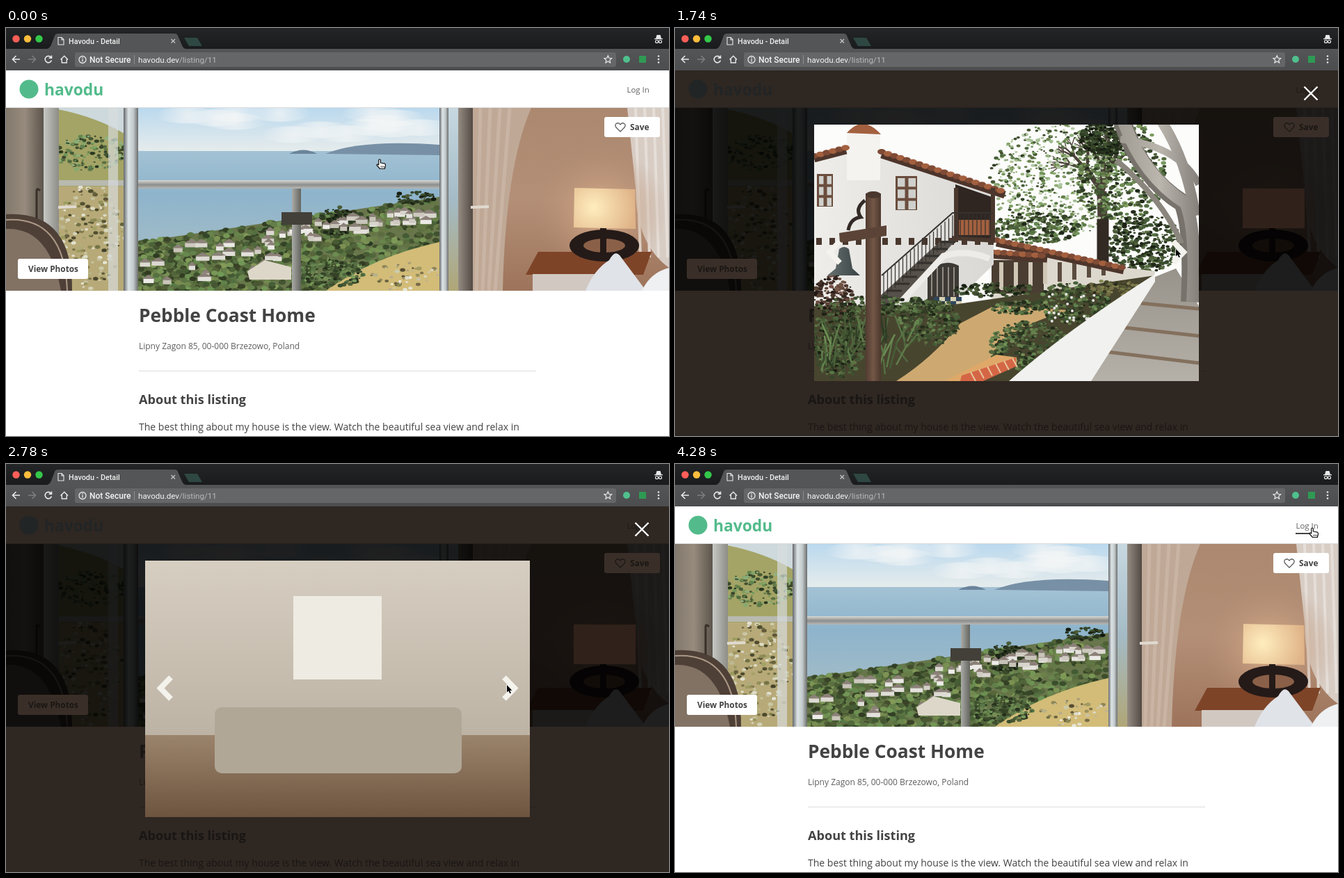
Animation, 953 px wide and 587 px high, one loop 4.92 s. Source, as an HTML page with a canvas:

```html
<!DOCTYPE html>
<html lang="en">
<head>
<meta charset="utf-8">
<title>Havodu - Detail</title>
<style>
html, body { margin: 0; width: 100%; height: 100%; overflow: hidden; background: #fff; }
canvas { display: block; }
</style>
</head>
<body>
<canvas id="stage" width="953" height="587"></canvas>
<script>
const W = 953, H = 587, LOOP = 4920, OPEN = 640, CLOSE = 4280;
const stage = document.getElementById('stage').getContext('2d');
let g = stage, seed = 7;

// ---- drawing helpers
const rnd = () => (seed = (seed * 16807) % 2147483647) / 2147483647;
const times = (n, draw) => { for (let i = 0; i < n; i++) draw(i); };
const rect = (fill, x, y, w, h) => { g.fillStyle = fill; g.fillRect(x, y, w, h); };
const oval = (fill, x, y, rx, ry = rx) => {
  g.beginPath(); g.ellipse(x, y, rx, ry, 0, 0, 7); g.fillStyle = fill; g.fill();
};
const round = (fill, x, y, w, h, r) => { g.beginPath(); g.roundRect(x, y, w, h, r); g.fillStyle = fill; g.fill(); };
const shape = (fill, d) => { g.fillStyle = fill; g.fill(new Path2D(d)); };
const stroke = (color, width, d) => { g.strokeStyle = color; g.lineWidth = width; g.stroke(new Path2D(d)); };
const line = (color, width, x0, y0, x1, y1) => stroke(color, width, `M${x0} ${y0}L${x1} ${y1}`);
const text = (s, x, y, font, fill) => { g.font = font; g.fillStyle = fill; g.fillText(s, x, y); };
const sans = (size, weight = 400) => `${weight} ${size}px "Open Sans", sans-serif`;
const ui = (size, weight = 400) => `${weight} ${size}px Roboto, sans-serif`;
const blend = (gradient, colors) => {
  colors.forEach((c, i) => gradient.addColorStop(i / (colors.length - 1), c));
  return gradient;
};
const fadeY = (y0, y1, ...colors) => blend(g.createLinearGradient(0, y0, 0, y1), colors);
const fadeX = (x0, x1, ...colors) => blend(g.createLinearGradient(x0, 0, x1, 0), colors);
const glow = (x, y, r, ...colors) => blend(g.createRadialGradient(x, y, 0, x, y, r), colors);
// Elliptical patch of small leaves, from shadow to sunlit
const leaves = (x, y, rx, ry, { hue = 85, light = 30, density = .2, size = 2.6 } = {}) =>
  times(rx * ry * density, () => {
    const a = rnd() * 2 * Math.PI, d = Math.sqrt(rnd()), s = size * (.5 + rnd());
    oval(`hsl(${hue + rnd() * 15} 25% ${light * (.4 + rnd() * 1.2)}%)`,
      x + Math.cos(a) * d * rx, y + Math.sin(a) * d * ry, s, s * .7);
  });
const limb = (color, x, y, angle, length, width, depth) => {
  const x1 = x + Math.cos(angle) * length, y1 = y + Math.sin(angle) * length;
  line(color, width, x, y, x1, y1);
  if (depth) [-.5, 0, .5].forEach(turn =>
    limb(color, x1, y1, angle + turn + rnd() * .4 - .2, length * .68, width * .55, depth - 1));
};
const layer = (draw, x = 0, y = 0, w = W, h = H) => {
  const c = document.createElement('canvas');
  c.width = W; c.height = H;
  g = c.getContext('2d');
  g.beginPath(); g.rect(x, y, w, h); g.clip();
  draw();
  g = stage;
  return c;
};

// ---- browser window
function browser() {
  const icon = '#e8e8e8';
  rect(fadeY(0, 30, '#232527', '#191b1d'), 0, 0, W, 30);
  rect(fadeY(30, 61, '#545557', '#4c4d4f'), 0, 30, W, 31);
  shape('#545557', 'M59 30Q63 29 65 24L70 11Q71 8 75 8H242Q246 8 247 11L253 25Q255 30 259 30Z');
  shape('#2f4742', 'M256 14H275L282 26H263Z');
  ['#fb5f58', '#fbbd3c', '#34c84a'].forEach((c, i) => oval(c, 14.5 + i * 16.5, 15.5, 5.2));
  stroke(icon, 1.1, 'M75 13.5H80L83 16.5V24H75ZM80 13.5V17H83');
  text('Havodu - Detail', 90, 22.5, ui(10.8, 500), '#f1f1f1');
  stroke('#c8c8c8', 1.2, 'M237.5 16l5.5 5.5m0-5.5l-5.5 5.5');
  shape(icon, 'M934 15l1.5-5h5l1.5 5zM932 15h12v1.3h-12z');
  stroke(icon, 1.2, 'M937.5 19.5a2 2 0 1 1-4 0a2 2 0 1 1 4 0h1a2 2 0 1 1 4 0a2 2 0 1 1-4 0');
  stroke(icon, 1.6, 'M20 45H9.5M14.5 40l-5 5l5 5');
  stroke('#7d7e80', 1.6, 'M32 45H42.5M37.5 40l5 5l-5 5');
  stroke(icon, 1.6, 'M64.6 42.2A4.7 4.7 0 1 0 65.4 46.5M65.5 39.5v3.8h-3.8');
  stroke(icon, 1.4, 'M78.5 45.5l5.3-5.2l5.2 5.2M80.3 44.5V50h7v-5.5');
  round('#656668', 99, 35, 778, 21, 3);
  stroke(icon, 1.3, 'M115 45.5a5 5 0 1 1-10 0a5 5 0 1 1 10 0M110 44.5v4M110 42v1.4');
  text('Not Secure', 120, 49.5, ui(12, 500), '#f4f4f4');
  rect('#8b8c8e', 184, 39, 1, 13);
  text('havodu.dev', 190, 49.5, ui(11.6), '#f4f4f4');
  text('/listing/11', 190 + g.measureText('havodu.dev').width, 49.5, ui(11.6), '#b9babb');
  const star = Array.from({ length: 10 }, (_, i) => {
    const a = (i / 5 - .5) * Math.PI, r = i % 2 ? 2.6 : 5.6;
    return [865.3 + r * Math.cos(a), 45.4 + r * Math.sin(a)];
  });
  stroke(icon, 1.2, `M${star.join('L')}Z`);
  oval('#4fc08d', 892, 45, 5);
  rect('#2f9a54', 910, 40, 10, 10);
  times(3, i => oval(icon, 938, 40.5 + i * 4.5, 1.3));
}

// ---- listing hero: a bay seen through open balcony doors
function hero() {
  const top = 115, bottom = 378;
  const post = (x, w) => rect(fadeX(x, x + w, '#63676a', '#dde4e6', '#c3cacc', '#6c6d6c'), x, top, w, bottom - top);
  // hillside in the left pane
  rect('#cdd9dc', 75, top, 95, 263);
  shape('#a4a466', 'M75 117Q130 128 170 152V378H75Z');
  leaves(122, 180, 55, 25, { light: 38, density: .12 });
  rect('#b7aa78', 75, 228, 95, 150);
  leaves(122, 300, 50, 75, { hue: 48, light: 55, density: .06 });
  rect('#b8b9b0', 75, 219, 95, 8);
  rect('#dadfe0aa', 147, top, 14, 263);
  // sky, sea and headlands
  rect(fadeY(top, 178, '#bbd9ee', '#e6ecec'), 190, top, 433, 63);
  times(14, () => {
    const x = 220 + rnd() * 380, y = 120 + rnd() * 35;
    oval(glow(x, y, 45, '#f4f6f6bb', '#f4f6f600'), x, y, 45, 12);
  });
  rect(fadeY(177, 300, '#a3c2d4', '#8eb4cc', '#9dbac8'), 190, 177, 433, 140);
  shape('#6a849b', 'M407 181Q428 170 447 181Z');
  shape('#7790a6', 'M459 181Q510 160 623 168V183Z');
  // coastal town below a rising ridge
  const ridge = x => 308 - (x - 190) * .15;
  shape('#69764c', `M190 ${ridge(190)}L623 ${ridge(623)}V378H190Z`);
  times(1500, () => {
    const x = 190 + rnd() * 433, y = ridge(x) + rnd() * (bottom - ridge(x));
    oval(`hsl(${78 + rnd() * 20} 27% ${18 + rnd() * 30}%)`, x, y, 5, 3.5);
  });
  leaves(475, 278, 27, 22, { light: 18 });
  leaves(588, 244, 28, 10, { light: 18 });
  times(65, () => {
    const x = 192 + rnd() * 415, y = ridge(x) + 8 + rnd() * (x < 410 ? 58 : 22), w = 8 + rnd() * 12;
    shape('#8c8179', `M${x - 2} ${y}l${w / 2 + 2} -6l${w / 2 + 2} 6z`);
    rect(`hsl(40 12% ${75 + rnd() * 18}%)`, x, y, w, 6);
  });
  shape('#d2bc78', 'M460 378Q530 328 623 308V378Z');
  leaves(575, 358, 50, 20, { hue: 42, light: 60, density: .05 });
  leaves(470, 352, 48, 20, { light: 32 });
  shape('#ddd7c9', 'M347 350l25-16l38 10v18h-60z');
  // railing and frames
  rect(fadeY(219, 232, '#d8d8d4', '#8d8f8e', '#bfc0bd'), 190, 219, 433, 12);
  rect(fadeX(411, 424, '#aaaaa6', '#64655f'), 411, 231, 13, 147);
  rect('#43403a', 396, 265, 44, 18);
  rect(fadeX(0, 54, '#83796c', '#968b7d', '#5d554c'), 0, top, 54, 263);
  rect(fadeX(54, 76, '#c6c8c5', '#8d8c86'), 54, top, 22, 263);
  post(169, 21);
  post(623, 13);
  rect(fadeY(top, bottom, '#c7d8e0', '#a4bbc6', '#b0a677'), 636, top, 14, 263);
  rect(fadeX(650, 671, '#958c83', '#524a44'), 650, top, 21, 263);
  // wall and curtains
  rect(fadeY(top, bottom, '#ab886f', '#b48f77', '#9d745b'), 671, top, 282, 263);
  shape('#bfa896', 'M671 115H755Q718 200 714 378H671Z');
  shape('#d8cdc4', 'M893 115H953V345Q905 310 905 230Z');
  times(4, i => {
    line('#d2c0b188', 5, 682 + i * 14, top, 676 + i * 9, bottom);
    line('#e5ded8', 4, 905 + i * 13, top, 912 + i * 13, 330);
  });
  [75, 668].forEach(x => line('#e0dad0', 4, x, 258, x + 26, 257));
  // lamp, cabinet and bed
  oval(glow(855, 265, 95, '#dcae88', '#b48f7700'), 855, 265, 95);
  shape('#7e4428', 'M765 322H928L916 355H747Z');
  rect('#d1c8c2', 757, 354, 100, 24);
  oval('#241a18', 860, 313, 50, 23);
  oval('#8b6048', 860, 313, 30, 10);
  rect('#241a18', 854, 287, 9, 38);
  shape(glow(845, 258, 60, '#ffedbd', '#dfb388'), 'M817 230L904 232L905 289L816 287Z');
  shape('#e0e3e8', 'M833 378Q845 348 867 334Q875 319 882 327L920 378Z');
  shape('#eef0f2', 'M914 378Q926 352 953 345V378Z');
  // armchair
  shape('#4e4037', 'M0 268Q96 262 95 378H0Z');
  shape('#827264', 'M0 289Q62 286 79 378H0Z');
  stroke('#ab9886', 2, 'M0 276Q84 270 88 378');
  stroke('#393029', 3, 'M44 274V235Q44 229 49 234');
}
const heroLayer = layer(hero, 0, 115, W, 263);

// ---- listing page, plain or dimmed behind the gallery
function page(dim) {
  const c = dim
    ? { paper: '#2f2722', ink: '#191614', soft: '#1b1816', brand: '#222526', rule: '#27211d', button: '#3a2f28' }
    : { paper: '#fff', ink: '#434343', soft: '#5e5e5e', brand: '#53bb8b', rule: '#dcdcdc', button: '#fff' };
  rect(c.paper, 0, 61, W, H - 61);
  oval(c.brand, 33, 88, 13.5);
  text('havodu', 55, 96.5, sans(22.8, 700), c.brand);
  text('Log In', 892.5, 93, sans(11.4), c.soft);
  rect(c.rule, 0, 114, W, 1);
  g.drawImage(heroLayer, 0, 0);
  if (dim) {
    rect('rgba(0,0,0,.87)', 0, 115, W, 263);
    rect('#30211a', 816, 231, 89, 57);
  }
  round(c.button, 860, 128, 80, 29, 3);
  round(c.button, 17, 332, 101, 29, 3);
  stroke(c.soft, 1.3, 'M883 149L877 143Q874.5 139.5 877.5 137.3Q881 135.7 883 139Q885 135.7 888.5 137.3Q891.5 139.5 889 143Z');
  text('Save', 897, 147, sans(11.9, 700), c.ink);
  text('View Photos', 32, 351, sans(11.8, 700), c.ink);
  text('Pebble Coast Home', 191, 423, sans(26.3, 700), c.ink);
  text('Lipny Zagon 85, 00-000 Brzezowo, Poland', 191, 461.5, sans(12), c.soft);
  rect(c.rule, 191, 493, 571, 1);
  text('About this listing', 191, 541, sans(18.1, 700), c.ink);
  text('The best thing about my house is the view. Watch the beautiful sea view and relax in', 191, 579, sans(14), c.ink);
  browser();
}

// ---- gallery pictures
function villa() {
  const timber = '#4a382e', tile = '#a3603f', iron = '#35322f';
  const eave = (x0, y0, x1, y1) => {
    line('#4d352b', 11, x0, y0 + 4, x1, y1 + 4);
    const n = (x1 - x0) / 9;
    times(n, i => oval(i % 2 ? tile : '#7f4b35', x0 + i * 9, y0 + (y1 - y0) * i / n, 6, 4));
  };
  const sash = (x, y, w, h) => {
    rect('#6a4d3d', x, y, w, h);
    times(6, i => rect('#cfd0cc', x + 3 + i % 2 * w / 2, y + 3 + (i >> 1) * h / 3, w / 2 - 5, h / 3 - 4));
  };
  rect('#fcfcfb', 200, 139, 553, 369);
  // trees and distant houses
  limb('#4a4038', 615, 290, -1.6, 55, 14, 4);
  leaves(550, 220, 98, 82, { light: 48, density: .1, size: 2.2 });
  leaves(640, 205, 65, 75, { light: 32, density: .12 });
  leaves(620, 158, 38, 26, { light: 17, density: .3 });
  leaves(520, 288, 65, 22, { light: 30 });
  leaves(675, 310, 55, 42, { light: 23 });
  line('#332a24', 17, 615, 372, 615, 275);
  shape('#ddd8ce', 'M455 320L690 350V378L455 390Z');
  shape('#4a3d32', 'M455 334H530V382H455Z');
  times(8, i => rect(i < 4 ? '#cfc6b6' : '#5b4c40', 466 + i * 21, 337, 6, 40 - i * 3));
  eave(462, 305, 645, 345);
  eave(455, 322, 535, 328);
  // main house
  shape(fadeX(200, 460, '#eeedea', '#d9d8d5'), 'M200 185L247 168L300 176L458 240V340L395 402L200 408Z');
  rect('#f4f3f0', 247, 149, 48, 70);
  shape(tile, 'M247 151Q270 124 296 153Z');
  shape('#2f2622', 'M403 225L458 244V303H403Z');
  shape(tile, 'M408 276H453V298H408Z');
  eave(200, 184, 246, 172);
  eave(297, 178, 474, 236);
  sash(317, 213, 31, 49);
  sash(204, 210, 23, 47);
  [401, 454].forEach(x => rect(timber, x, 230, 6, 78));
  times(14, i => rect(timber, 203 + i * 19, 302, 8, 10));
  line(timber, 6, 398, 302, 460, 306);
  // arch, stairs and railings
  shape('#3d3934', 'M363 400V352Q385 330 408 342V400Z');
  times(5, i => line('#cdc8bc', 1.2, 369 + i * 8, 344, 369 + i * 8, 386));
  times(20, i => rect((i >> 1) % 2 ? '#d9d2b4' : '#30475e', 372 + i % 10 * 4, 387 + (i > 9) * 6, 4, 6));
  shape('#56514a', 'M270 408L382 306H403L312 408Z');
  times(10, i => line('#34312d', 3, 282 + i * 11, 398 - i * 10, 304 + i * 11, 398 - i * 10));
  stroke('#eeece8', 9, 'M312 408L386 328Q420 318 452 332');
  times(19, i => line(iron, 1.2, 300 + i * 5.5, 354 - i * 4.7, 300 + i * 5.5, 388 - i * 4.7));
  times(9, i => line(iron, 1.2, 404 + i * 6, 268, 404 + i * 6, 302));
  stroke(iron, 2, 'M297 356L399 266H457');
  // garden around the path
  shape('#48452f', 'M200 400L400 398L690 356L500 508H200Z');
  leaves(300, 400, 100, 14, { light: 26 });
  shape('#cda971', 'M318 508Q370 475 410 425L460 399L566 406Q455 440 460 475L400 508Z');
  leaves(228, 385, 28, 30, { hue: 10, light: 24 });
  leaves(236, 450, 38, 55, { light: 24 });
  leaves(365, 425, 45, 32, { light: 27 });
  leaves(510, 458, 58, 36, { light: 29 });
  leaves(494, 402, 42, 10, { light: 28 });
  leaves(572, 396, 52, 30, { light: 30 });
  leaves(460, 377, 60, 10, { light: 22 });
  leaves(630, 374, 40, 11, { hue: 50, light: 28 });
  times(26, () => oval('#e6e3e2', 535 + rnd() * 75, 375 + rnd() * 48, 2));
  times(55, i => {
    const x = 205 + rnd() * 135, y = 440 + rnd() * 60;
    line(`hsl(95 25% ${18 + rnd() * 28}%)`, 2.5, x, y, x + rnd() * 36 - 18, y - 20 - rnd() * 25);
  });
  // pavement, garden wall and brick cap
  shape(fadeY(350, 508, '#98938b', '#b5b0a8'), 'M598 508L690 358L720 346L753 400V508Z');
  times(3, i => line('#83705d', 5, 622 + i * 24, 466 - i * 35, 753, 482 - i * 39));
  shape('#f1f1ef', 'M480 508Q560 437 690 354V365L598 508Z');
  shape('#dfa869', 'M388 508L462 470L491 474V486L440 508Z');
  shape('#d46645', 'M412 500L490 474V487L443 508H410Z');
  times(6, i => line('#e7c59c', 2, 425 + i * 12, 495 - i * 4, 432 + i * 12, 508 - i * 4));
  // pale roadside trunks
  const bark = fadeX(640, 753, '#a09b93', '#bab5ad', '#85807a');
  stroke('#77726b', 26, 'M643 135Q670 215 730 252Q745 290 740 394');
  stroke(bark, 18, 'M645 135Q672 212 734 252Q750 290 744 394');
  stroke(bark, 15, 'M700 135Q735 190 748 270');
  stroke(bark, 10, 'M640 160Q725 170 753 225');
  stroke('#8a857d', 8, 'M634 190Q700 245 728 310');
  // bell post
  rect(fadeX(274, 296, '#513b30', '#735747', '#4c372d'), 274, 238, 22, 270);
  oval(timber, 285, 240, 11, 5);
  shape('#5b4337', 'M236 295L304 284V299L237 309Z');
  stroke('#332a26', 5, 'M249 291Q252 274 267 272Q258 260 273 248');
  shape(fadeX(220, 266, '#667070', '#394343'), 'M236 318Q243 312 250 318L255 346L266 356H219L231 346Z');
}

function bathroom() {
  const marble = (x, y, w, h) => times(w * h / 900, () => {
    const vx = x + rnd() * w, vy = y + rnd() * h;
    line(rnd() < .5 ? '#86694a88' : '#c9bda888', 1.2, vx, vy, vx + 14, vy + rnd() * 24 - 12);
  });
  const towel = x => {
    line('#796e63', 3, x - 10, 271, x + 60, 270);
    rect(fadeX(x, x + 25, '#c9c8c5', '#e2e1de', '#bdbbb7'), x, 269, 25, 68);
    rect(fadeX(x + 26, x + 51, '#c9c8c5', '#e2e1de', '#bdbbb7'), x + 26, 269, 25, 66);
  };
  // ceiling vault and tiled wall
  rect(fadeY(130, 218, '#a79c8b', '#948979'), 200, 130, 553, 88);
  oval(glow(490, 130, 190, '#ddd3c1', '#a2978600'), 485, 126, 190, 45);
  times(160, i => rect(`hsl(33 22% ${60 + rnd() * 8}%)`, 295 + i % 20 * 23, 218 + (i / 20 | 0) * 23, 22.4, 22.4));
  marble(295, 218, 450, 170);
  line('#948370', 3, 295, 217, 725, 216);
  rect(fadeY(395, 517, '#9f886c', '#8d745a'), 295, 398, 458, 119);
  oval(glow(500, 435, 165, '#d8c09f', '#a0876900'), 500, 435, 165, 75);
  times(6, i => line('#86704f66', 1, 300, 410 + i * 19, 740, 403 + i * 22));
  times(12, i => line('#86704f66', 1, 335 + i * 31, 402, 200 + i * 58, 517));
  marble(310, 405, 430, 110);
  // marble partition
  rect('#857d71', 200, 130, 45, 387);
  shape('#a79f92', 'M236 130H295L316 517H250Z');
  rect('#584638', 280, 177, 14, 55);
  marble(202, 135, 90, 375);
  marble(202, 135, 90, 375);
  times(8, i => stroke('#776d61', 1, `M200 ${177 + i * 47}l42 -9l63 18`));
  // window
  rect('#d2c8b8', 429, 175, 124, 140);
  rect('#4b2314', 431, 177, 120, 135);
  [437, 495].forEach(x => rect('#72391f', x, 183, 50, 123));
  rect('#2e150d', 487, 179, 8, 132);
  times(20, i => rect(i < 8 ? '#f6f3e8' : '#eee3c6', 443 + i % 4 * 19 + (i % 4 > 1) * 19, 190 + (i >> 2) * 23, 18, 19));
  towel(348);
  towel(582);
  // stools and shelf
  shape('#71685e', 'M648 323L753 333V350L690 341Z');
  stroke('#5e3d28', 6, 'M308 392H328Q308 410 330 432');
  stroke('#6d422c', 6, 'M649 400Q658 430 699 446M699 403Q681 425 646 446M646 404H703');
  round('#d4c3a9', 641, 377, 64, 24, 9);
  // bath, tap and basket
  [462, 548].forEach(x => line('#777369', 6, x, 414, x, 444));
  shape(fadeY(375, 425, '#e6e4de', '#aca99f'), 'M398 376Q405 414 450 421Q512 429 553 416Q580 402 600 364Z');
  shape('#f2f0e9', 'M397 378Q397 370 420 366Q520 357 584 354Q601 355 600 365Q560 380 470 387Q405 389 397 378Z');
  shape('#bcb7aa', 'M410 377Q480 363 588 362Q520 383 410 377Z');
  stroke('#736f68', 4, 'M392 415V345Q394 332 403 342Q413 339 418 352M402 342L399 383');
  shape('#4c3223', 'M388 412H435L432 448Q410 458 390 448Z');
  times(5, i => line('#71503a', 1.5, 389, 420 + i * 7, 434, 420 + i * 7));
  times(3, i => oval('#dad4c9', 400 + i * 11, 411, 8, 6));
  // basin, bottles and glass edge
  rect('#513a2f', 722, 148, 31, 82);
  rect('#8b9290', 734, 155, 12, 68);
  rect('#cbd2d4', 709, 268, 43, 30);
  rect('#302d2c', 721, 268, 13, 29);
  rect('#abaca6', 704, 400, 14, 80);
  shape('#c5c9c7', 'M693 364Q705 355 753 358V418Q696 410 693 364Z');
  shape('#d8d6ca44', 'M738 218H753V517H713Z');
  line('#242321', 3, 737, 218, 712, 517);
}

function room(wall, floor, cloth) {
  rect(fadeY(139, 390, '#d6cec1', wall), 200, 139, 553, 251);
  rect(fadeY(390, 508, floor, '#6d543f'), 200, 390, 553, 118);
  rect('#eeebe2', 413, 190, 127, 120);
  round(cloth, 300, 350, 355, 95, 10);
}

const pagePlain = layer(() => page(false));
const pageDim = layer(() => page(true));
const picture = draw => layer(draw, 200, 139, 553, 369);
const house = picture(villa);
const lounge = picture(() => room('#b6a895', '#957b60', '#837466'));
const bedroom = picture(() => room('#bdb3a5', '#9b846c', '#b1a797'));
const bath = layer(bathroom, 200, 130, 553, 387);

// ---- timeline
const slideAt = t => t < 1900 ? house : t < 2380 ? lounge : t < 2780 ? bath : t < 3180 ? bedroom : house;
const glide = (t, start, end) => {
  const u = Math.min(1, Math.max(0, (t - start) / (end - start)));
  return u * u * (3 - 2 * u);
};

function pointer(t) {
  const settle = glide(t, 0, 520), toNext = glide(t, 1040, 1650), toClose = glide(t, 3360, 3940);
  g.save();
  g.translate(537 + 183 * toNext + 196 * toClose, 189 + 11 * settle + 118 * toNext - 226 * toClose);
  g.lineJoin = 'round';
  if (t < OPEN || t >= 4000) {
    const hand = 'M-1.3 8V1Q0-1 1.4 1V5L7.5 6.2Q9 7 8.4 9.5L7.3 13.5H.5L-4 8.5Q-3.8 6-1.3 8Z';
    shape('#fff', hand);
    stroke('#111', 1.2, hand);
    times(3, i => line('#111', .8, 2.2 + i * 2, 9.5, 2.2 + i * 2, 12));
  } else {
    const arrow = 'M0 0V10.5L2.4 8.4L4.2 12.3L6 11.5L4.3 7.7H7.5Z';
    stroke('#fff', 1.6, arrow);
    shape('#050505', arrow);
  }
  g.restore();
}

function gallery(t) {
  g.drawImage(pageDim, 0, 0);
  g.drawImage(slideAt(t), 0, 0);
  stroke('#f4f2ec', 8, 'M237 307l-15 15.5l15 15.5M716 307l15 15.5l-15 15.5');
  stroke('#fff', 2.4, 'M904.5 84.5l19 19m0-19l-19 19');
}

function frame() {
  const t = performance.now() % LOOP;
  if (t >= OPEN && t < CLOSE) gallery(t);
  else {
    g.drawImage(pagePlain, 0, 0);
    if (t >= CLOSE) rect('#444', 892, 99, 33, 2);
  }
  pointer(t);
  requestAnimationFrame(frame);
}
frame();
</script>
</body>
</html>
```
